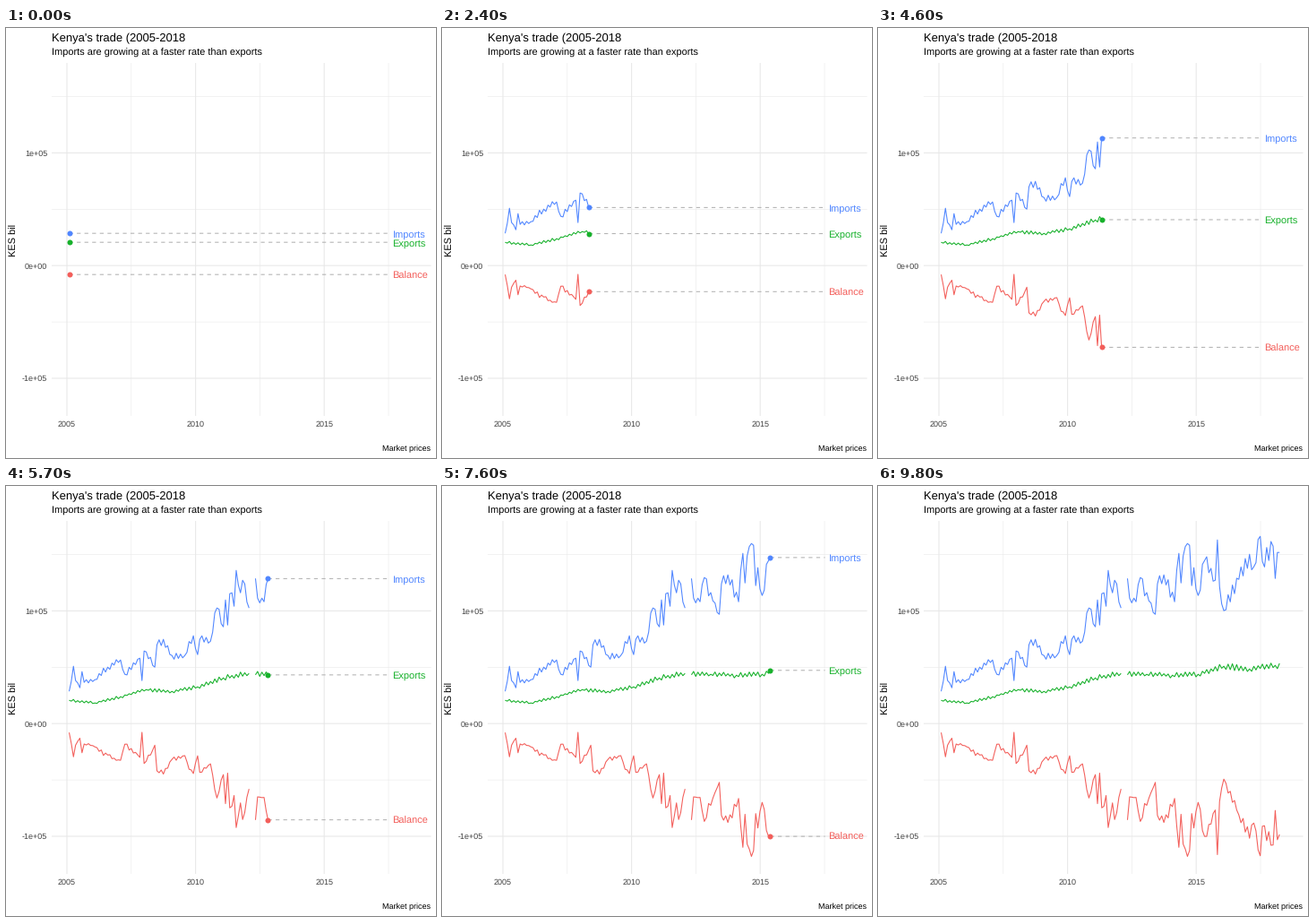
A matplotlib script for the animation above (10 s loop, 480 px wide and 480 px high).

```python
import numpy as np
import matplotlib.pyplot as plt
from matplotlib.animation import FuncAnimation

SIZE, DPI = 480, 72
FRAMES, INTERVAL = 100, 100
REVEAL_FRAMES = 97          # the markers reach the last month here, then vanish
plt.rcParams.update({"font.family": "Liberation Sans", "text.hinting": "none",
                     "text.hinting_factor": 1})

# Stage geometry in pixels
LEFT, RIGHT, TOP, BOTTOM = 51, 474.5, 39, 433
ZERO_Y, UNIT_Y = 265.2, 125.8        # height of 0 and of 1e5
X_2005, YEAR = 68.0, 28.72
FIRST_X, MONTH = 70.5, 2.3905
LABEL_X, SEGMENT_END = 431.5, 427.5

GRID, DASH, TICK_TEXT = "#E8E8E8", "#B4B4B4", "#404040"
COLORS = {"Balance": "#F35E5A", "Exports": "#17B12B", "Imports": "#5086FF"}

# Main turning points of imports: (month since February 2005, height)
IMPORT_TURNS = [
    (0, 36), (2, 64), (3, 48), (5, 40), (6, 58), (7, 46), (12, 49), (18, 63),
    (24, 71), (26, 55), (33, 73), (34, 48), (35, 81), (40, 63), (41, 88),
    (44, 94), (48, 76), (54, 76), (58, 98), (60, 77), (61, 94), (66, 92),
    (69, 129), (72, 108), (73, 138), (74, 110), (75, 145), (77, 131),
    (78, 171), (80, 146), (81, 160), (84, 129), (87, 162), (88, 140),
    (91, 136), (93, 163), (97, 137), (100, 122), (101, 156), (104, 166),
    (109, 136), (111, 190), (112, 157), (113, 187), (115, 201), (116, 199),
    (117, 154), (118, 174), (120, 143), (123, 182), (128, 160), (129, 205),
    (130, 153), (132, 126), (139, 161), (144, 189), (146, 175), (149, 209),
    (150, 181), (155, 198), (156, 162), (157, 191), (158, 191)]
# Exports, one height a year
EXPORT_LEVELS = [26, 23, 30, 38, 36, 41, 51, 56, 55, 54, 55, 64, 61, 65]
MISSING = slice(85, 87)

rng = np.random.default_rng(7)
months = np.arange(159)


def monthly(at, heights, wobble):
    """Join the points and let the months between them zigzag a little."""
    swing = wobble * rng.uniform(0.3, 1, len(months)) * (-1.0) ** months
    swing[list(at)] = 0
    values = np.interp(months, at, heights) * (1 + swing)
    values[MISSING] = np.nan
    return values


imports = monthly(*zip(*IMPORT_TURNS), 0.06)
exports = monthly(range(0, 159, 12), EXPORT_LEVELS, 0.06)
series = {"Balance": exports - imports, "Exports": exports, "Imports": imports}

fig = plt.figure(figsize=(SIZE / DPI, SIZE / DPI), dpi=DPI, facecolor="white")
ax = fig.add_axes([0, 0, 1, 1])
ax.set(xlim=(0, SIZE), ylim=(SIZE, 0))
ax.axis("off")


def rule(xs, ys, major):
    ax.plot(xs, ys, color=GRID, lw=1.07 if major else 0.53, snap=False,
            solid_capstyle="butt", zorder=2 if major else 1)


def write(x, y, text, size, color="black", va="baseline", **kw):
    return ax.text(x, y, text, fontsize=size, color=color, va=va, zorder=6, **kw)


for half in range(-2, 4):
    y = ZERO_Y - half * UNIT_Y / 2
    rule([LEFT, RIGHT], [y, y], half % 2 == 0)
y = ZERO_Y + UNIT_Y / 2
for step in range(6):
    x = X_2005 + step * 2.5 * YEAR
    rule([x, x], [TOP, BOTTOM], step % 2 == 0)
    if step % 2 == 0:
        write(x, 445, str(2005 + step * 5 // 2), 8.8, TICK_TEXT, ha="center")
for level, name in ((1, "1e+05"), (0, "0e+00"), (-1, "-1e+05")):
    write(46.2, ZERO_Y - level * UNIT_Y + 3.4, name, 8.8, TICK_TEXT, ha="right")

write(LEFT, 15, "Kenya's trade (2005-2018", 13.2)
write(LEFT, 31, "Imports are growing at a faster rate than exports", 11)
write(RIGHT, 472, "Market prices", 8.8, ha="right")
write(9.5, 236.5, "KES bil", 11, rotation=90, ha="center", va="center")


class Track:
    """One series: its line, marker, dashed leader and name."""

    def __init__(self, name, heights):
        color = COLORS[name]
        self.y = ZERO_Y - heights
        self.line, = ax.plot([], [], color=color, lw=1.07, zorder=3,
                             solid_capstyle="butt", solid_joinstyle="round")
        self.leader, = ax.plot([], [], color=DASH, lw=1.07, zorder=4,
                               dashes=(4, 4), dash_capstyle="butt", snap=False)
        self.dot, = ax.plot([], [], "o", color=color, ms=6, mew=0, zorder=5)
        self.label = write(LABEL_X, 0, name, 11.04, color)

    def reveal(self, pos, finished):
        head = np.interp(pos, months, self.y)
        seen = months <= pos
        x = FIRST_X + MONTH * pos
        self.line.set_data(np.append(FIRST_X + MONTH * months[seen], x),
                           np.append(self.y[seen], head))
        shown = not (finished or np.isnan(head))
        for artist in (self.leader, self.dot, self.label):
            artist.set_visible(shown)
        if shown:
            self.leader.set_data([x, SEGMENT_END], [head, head])
            self.dot.set_data([x], [head])
            self.label.set_y(head + 4.2)


tracks = [Track(name, heights) for name, heights in series.items()]


def update(frame):
    pos = min(frame / REVEAL_FRAMES, 1) * months[-1]
    for track in tracks:
        track.reveal(pos, frame > REVEAL_FRAMES)
    return []


anim = FuncAnimation(fig, update, frames=FRAMES, interval=INTERVAL,
                     init_func=lambda: update(0), repeat=True, repeat_delay=0)
plt.show()
```
